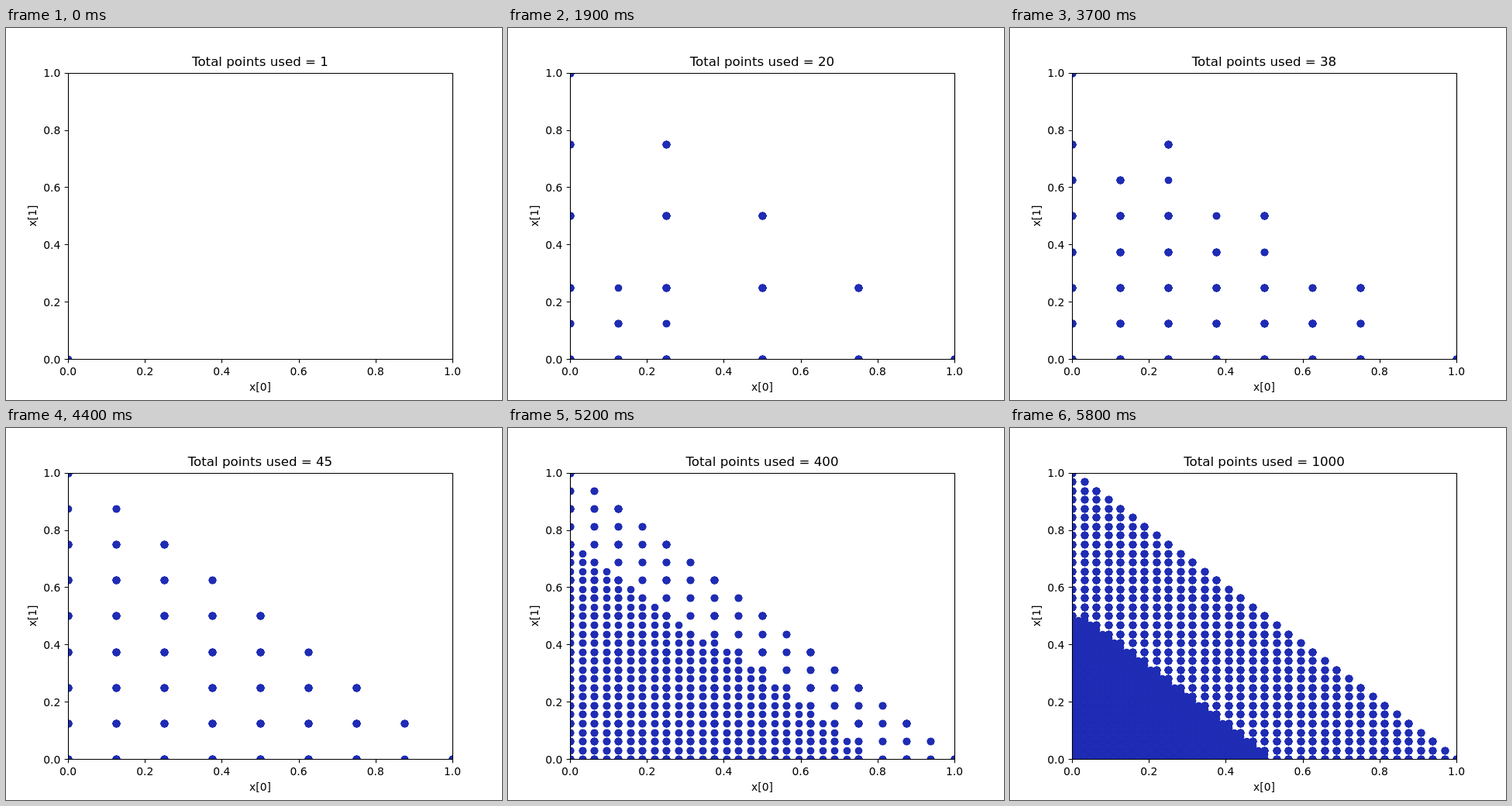
Write an HTML page with a canvas that moves like this. It is 640 px wide and 480 px high and loops after 5900 ms.

```html
<!DOCTYPE html>
<html lang="en">
<head>
<meta charset="utf-8">
<title>Simplex refinement</title>
<style>
  html, body { margin: 0; width: 100%; height: 100%; overflow: hidden; background: #fff; }
  canvas, svg { position: absolute; left: 0; top: 0; width: 640px; height: 480px; }
  text { font: 13.889px "DejaVu Sans", sans-serif; fill: #000; text-anchor: middle; }
  #title { font-size: 16.667px; }
  path { stroke: #000; stroke-width: 1.11; fill: none; }
</style>
</head>
<body>
<canvas id="plot" width="640" height="480"></canvas>
<svg id="axes" viewBox="0 0 640 480">
  <path d="M80.5 58.5H576.5V427.5H80.5Z" stroke-linecap="square"/>
  <text id="title" x="328" y="49"></text>
  <text x="328" y="468">x[0]</text>
  <text transform="translate(39 242.4) rotate(-90)">x[1]</text>
</svg>
<script>
const STEP = 100, FRAMES = 59, SLOW = 49, MAX_COATS = 10;
const LEFT = 80, BOTTOM = 427.2, WIDTH = 496, HEIGHT = 369.6;
const COLOR = '#1f2cb4';

const toX = x => LEFT + x * WIDTH;
const toY = y => BOTTOM - y * HEIGHT;
const snap = v => Math.floor(v + 0.5) + 0.5;

// Edge midpoints of each finer triangle grid, strip by strip from the origin.
function refine(levels) {
  const pts = [[0, 0], [1, 0], [0, 1]];
  for (let m = 1; m < 2 ** levels; m *= 2) {
    const add = (i, j) => pts.push([i / (2 * m), j / (2 * m)]);
    for (let k = 0; k < m; k++) {
      const s = 2 * k + 1;
      for (let i = s - 1; i > 0; i--) add(i, s - i);
      for (let i = s; i > 0; i -= 2) add(i, s + 1 - i);
      add(s, 0);
      add(0, s);
    }
  }
  return pts;
}

const countAt = f => f < SLOW ? f + 1 : (f - SLOW + 1) * 100;
const firstFrame = n => n < SLOW ? n : SLOW + Math.floor(n / 100);

const dots = refine(6).slice(0, countAt(FRAMES - 1)).map(([x, y], n) => ({
  x: snap(toX(x)), y: snap(toY(y)), born: firstFrame(n)
}));

const axes = document.getElementById('axes');
const title = document.getElementById('title');
const ctx = document.getElementById('plot').getContext('2d');

function svg(tag, attrs, text = '') {
  const el = document.createElementNS('http://www.w3.org/2000/svg', tag);
  for (const key in attrs) el.setAttribute(key, attrs[key]);
  el.textContent = text;
  axes.append(el);
  return el;
}

for (let i = 0; i <= 5; i++) {
  const label = (i / 5).toFixed(1), x = toX(i / 5), y = toY(i / 5);
  svg('path', { d: `M${snap(x)} 427.5v4.86M80.5 ${snap(y)}h-4.86` });
  svg('text', { x, y: 448 }, label);
  svg('text', { x: 70.3, y: Math.round(y + 5.3), style: 'text-anchor:end' }, label);
}

ctx.beginPath();
ctx.rect(80, 58, 497, 370);
ctx.clip();
ctx.fillStyle = ctx.strokeStyle = COLOR;
ctx.lineWidth = 1.389;

function draw(frame) {
  const count = countAt(frame);
  title.textContent = 'Total points used = ' + count;
  ctx.clearRect(0, 0, 640, 480);
  for (const { x, y, born } of dots.slice(0, count)) {
    // Dots are painted again on every step, which firms up their rims.
    const coats = Math.min(frame - born + 1, MAX_COATS);
    ctx.beginPath();
    ctx.arc(x, y, 4.167, 0, 2 * Math.PI);
    for (let c = 0; c < coats; c++) {
      ctx.fill();
      ctx.stroke();
    }
  }
}

let shown = -1;
const start = performance.now();

function tick() {
  const frame = Math.floor((performance.now() - start) / STEP) % FRAMES;
  if (frame !== shown) draw(shown = frame);
  requestAnimationFrame(tick);
}
tick();
</script>
</body>
</html>
```
